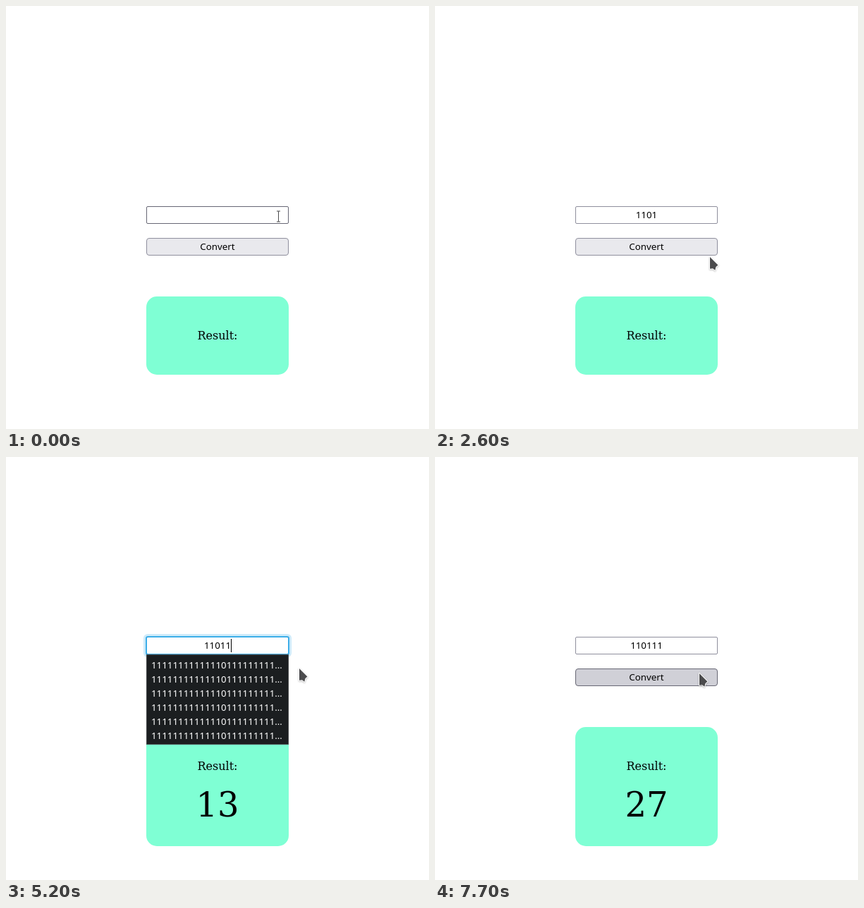
An HTML page that plays this animation: 600x600 px, repeating every 8 s.

```html
<!DOCTYPE html>
<html lang="en">
<head>
<meta charset="utf-8">
<title>Binary converter</title>
<style>
  html, body { margin: 0; width: 100%; height: 100%; overflow: hidden; background: #fff; }
  #stage { position: relative; width: 600px; height: 600px; overflow: hidden; color: #000;
    font: 13.3333px/25px "Noto Sans", sans-serif; }
  #stage div, #stage svg { position: absolute; box-sizing: border-box; }
  #page { left: 199px; top: 284px; width: 202px; }
  #field, #button { left: 0; width: 202px; height: 25px; border: 1px solid #8f8f9d;
    line-height: 23px; text-align: center; white-space: pre; }
  #field { top: 0; border-radius: 2px; background: #fff; }
  #button { top: 45px; border-radius: 4px; background: #e9e9ed; }
  #field.hover { border-color: #676774; }
  #button.hover { background: #d0d0d7; border-color: #676774; }
  #button.active { background: #b1b1b9; border-color: #484851; }
  #ring { left: -1px; top: -1px; width: 204px; height: 27px; border: 2px solid #3daee9;
    border-radius: 3px; box-shadow: 0 0 0 3px rgba(61, 174, 233, .25); }
  #caret { top: 3px; width: 1px; height: 19px; background: #000; }
  #result { left: 0; top: 128px; width: 202px; height: 111px; border-radius: 15px;
    background: #7fffd4; text-align: center; font-family: "DejaVu Serif", serif; }
  #label { top: 46px; width: 100%; font-size: 16px; line-height: 19px; }
  #value { top: 82px; width: 100%; font-size: 48px; line-height: 56px; }
  #popup { left: 0; top: 25px; width: 202px; height: 128px; padding: 4px 6px; background: #1b1e20;
    border: 1px solid #4a4d4f; border-radius: 1px; box-shadow: 0 0 1px rgba(0, 0, 0, .6);
    color: #fcfcfc; line-height: 20px; white-space: pre; }
  #thumb { left: 195px; top: 5px; width: 3px; height: 39px; border-radius: 2px; background: #7f8385; }
  #arrow { filter: drop-shadow(0 1px 1px rgba(0, 0, 0, .25)); }
  #arrow, #beam { left: 0; top: 0; overflow: visible; }
</style>
</head>
<body>
<div id="stage">
  <div id="page">
    <div id="result"><div id="label">Result:</div><div id="value"></div></div>
    <div id="button">Convert</div>
    <div id="field"><span id="text"></span></div>
    <div id="ring"></div>
    <div id="caret"></div>
    <div id="popup"><span id="rows"></span><div id="thumb"></div></div>
  </div>
  <svg id="arrow" width="16" height="24">
    <path d="M0 0L11.5 11.5L8.5 14L7.3 18.7L4 16.3L0 16.7Z" fill="#4b4b4d" stroke="#fff"
      stroke-width="2" paint-order="stroke" stroke-linejoin="round"/>
  </svg>
  <svg id="beam" width="8" height="18">
    <path d="M-2.5 -7.5H2.5M0 -7.5V7.5M-2.5 7.5H2.5" fill="none" stroke="#fff" stroke-width="3"/>
    <path d="M-2.5 -7.5H2.5M0 -7.5V7.5M-2.5 7.5H2.5" fill="none" stroke="#4b4b4d"/>
  </svg>
</div>
<script>
const LOOP = 8000;
const ones = Array(6).fill("1".repeat(13) + "0" + "1".repeat(9) + "…").join("\n");
const similar = ["110101", "110101010010", "1101010100101", "110101001", "11010100101", "11010101"].join("\n");

const arrow = (x, y) => ({ pointer: "arrow", x, y });
const beam = (x, y) => ({ pointer: "beam", x, y });
const type = text => ({ text });
const list = rows => ({ rows });
const field = hover => ({ fieldHover: hover });
const button = mode => ({ button: mode });
const focus = on => ({ focus: on });
const result = value => ({ value });

// Each step lists what changes at that time; everything else persists.
const steps = [
  [0, beam(386.5, 298.5), type(""), list(""), field(true), button(""), focus(false), result(""), { thumb: false }],
  [100, focus(true)],
  [900, type("1")],
  [1000, list(ones)],
  [1100, type("11")],
  [1300, type("110")],
  [1400, list(similar)],
  [1600, type("1101"), arrow(384, 300), { thumb: true }],
  [2000, arrow(440, 301), field(false)],
  [2100, arrow(480, 306), list(""), { thumb: false }],
  [2200, focus(false)],
  [2400, arrow(468, 318)],
  [2500, arrow(430, 344)],
  [2600, arrow(390, 356)],
  [2700, arrow(362, 347), button("hover")],
  [2800, arrow(349, 338)],
  [3200, button("active")],
  [3300, button(""), result("13")],
  [3700, arrow(352, 352)],
  [3800, arrow(355, 367)],
  [4000, arrow(358, 342)],
  [4100, arrow(362, 310), button("hover")],
  [4200, beam(368.5, 270.5), button(""), field(true)],
  [4400, focus(true)],
  [4700, type("11011"), arrow(369, 284), field(false)],
  [4800, list(ones)],
  [4900, arrow(382, 289)],
  [5000, arrow(398, 295)],
  [5100, arrow(412, 299)],
  [5200, arrow(416, 300)],
  [5300, list("")],
  [5400, focus(false), arrow(404, 302)],
  [5500, arrow(370, 303), button("hover")],
  [5600, arrow(368, 304)],
  [6100, button("active")],
  [6200, button("hover"), result("27")],
  [6700, beam(370.5, 270.5), button(""), field(true)],
  [6800, focus(true)],
  [6900, type("110111")],
  [7000, list(ones)],
  [7100, arrow(410, 292), field(false)],
  [7200, arrow(446, 304)],
  [7300, list("")],
  [7400, focus(false)],
  [7500, arrow(416, 314)],
  [7600, arrow(386, 309), button("hover")],
  [7700, arrow(375, 307)]
];

const $ = id => document.getElementById(id);
const show = (id, on) => { $(id).style.display = on ? "block" : "none"; };
let shown = -1;

function draw(s) {
  $("page").style.top = (s.value ? 255 : 284) + "px";
  $("result").style.height = (s.value ? 169 : 111) + "px";
  $("value").textContent = s.value;
  $("text").textContent = s.text;
  $("rows").textContent = s.rows;
  $("field").className = s.fieldHover ? "hover" : "";
  $("button").className = s.button;
  show("ring", s.focus);
  show("caret", s.focus);
  $("caret").style.left = Math.floor(101 + $("text").getBoundingClientRect().width / 2) + "px";
  show("popup", s.rows);
  show("thumb", s.thumb);
  for (const id of ["arrow", "beam"]) {
    show(id, s.pointer === id);
    $(id).style.transform = `translate(${s.x}px, ${s.y}px)`;
  }
}

function tick() {
  const t = performance.now() % LOOP;
  const past = steps.filter(([at]) => at <= t);
  if (past.length !== shown) {
    shown = past.length;
    draw(Object.assign({}, ...past.flatMap(([, ...changes]) => changes)));
  }
  requestAnimationFrame(tick);
}
tick();
</script>
</body>
</html>
```
